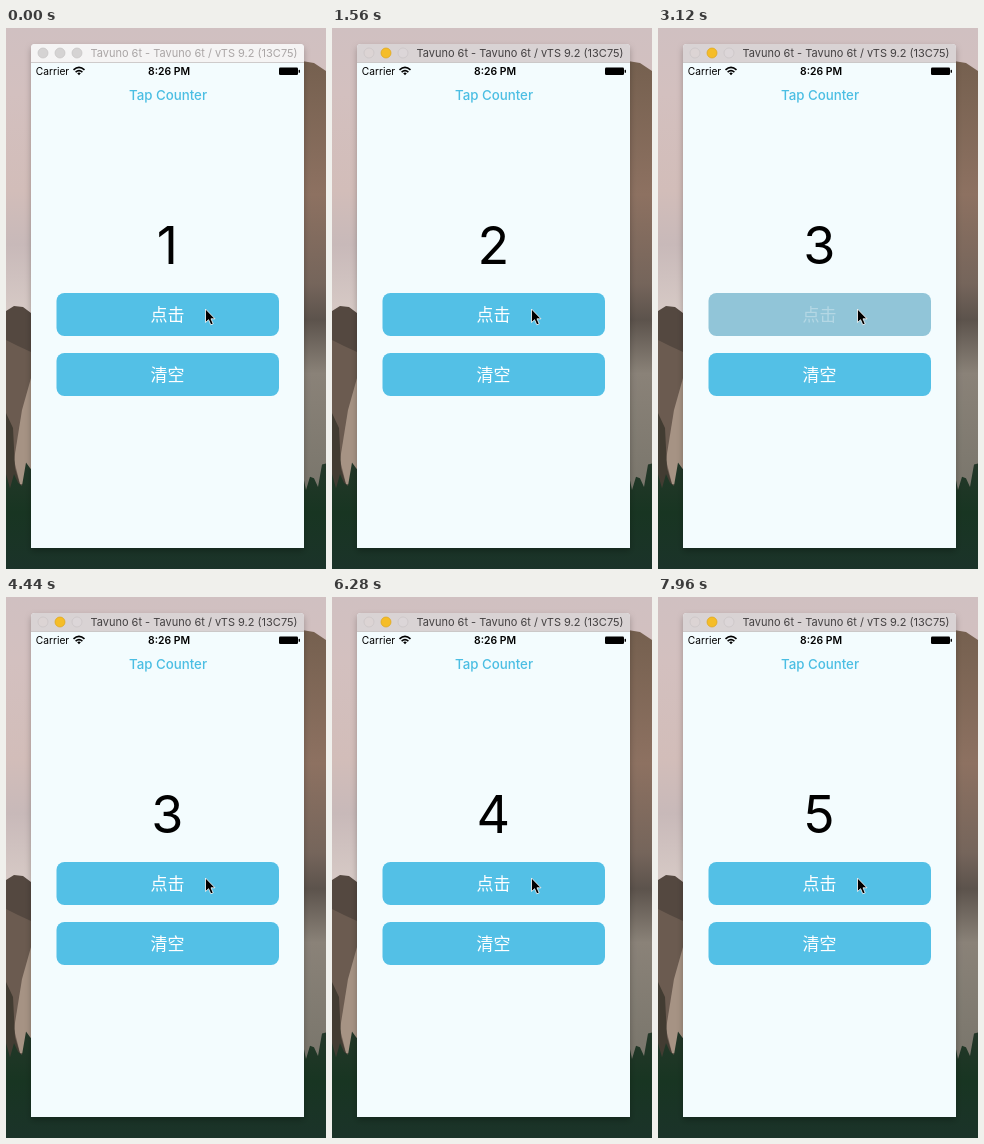
Animation of 320 by 541 pixels, one loop 8 s. Source, as an HTML page:

```html
<!DOCTYPE html>
<html lang="zh">
<head>
<meta charset="utf-8">
<title>Tap Counter</title>
<style>
  html, body { margin: 0; height: 100%; overflow: hidden; }
  svg { display: block; width: 100vw; height: 100vh; }
  text { font-family: Inter, Roboto, sans-serif; text-anchor: middle; }
  .label { font: 17px "Noto Sans CJK SC", "Noto Sans CJK", sans-serif; fill: #fff; }
</style>
</head>
<body>
<svg viewBox="0 0 320 541">
  <defs>
    <linearGradient id="sky" x2="0" y2="1">
      <stop offset="0" stop-color="#d0c0c1"/>
      <stop offset=".12" stop-color="#d3c0bf"/>
      <stop offset=".3" stop-color="#d2bdb9"/>
      <stop offset=".4" stop-color="#c8b9b9"/>
      <stop offset=".52" stop-color="#d6c9c5"/>
    </linearGradient>
    <linearGradient id="cliff" x2="0" y2="1">
      <stop offset="0" stop-color="#75604f"/>
      <stop offset=".3" stop-color="#8d7161"/>
      <stop offset=".5" stop-color="#75655b"/>
      <stop offset=".58" stop-color="#5c534c"/>
      <stop offset=".7" stop-color="#8a8278"/>
      <stop offset="1" stop-color="#77746a"/>
    </linearGradient>
    <linearGradient id="forest" x2="0" y2="1">
      <stop offset="0" stop-color="#26382a"/>
      <stop offset=".5" stop-color="#183522"/>
      <stop offset="1" stop-color="#1b3329"/>
    </linearGradient>
    <filter id="shadow" x="-20%" y="-10%" width="140%" height="120%">
      <feDropShadow dx="0" dy="3" stdDeviation="3" flood-opacity=".25"/>
    </filter>
  </defs>

  <!-- mountain wallpaper -->
  <rect width="320" height="541" fill="url(#sky)"/>
  <path d="M0 283L8 278L17 279L25 285L40 290V480H0Z" fill="#544840"/>
  <path d="M0 312L12 318L25 324V480H0Z" fill="#6b5b50"/>
  <path d="M25 350L16 382L8 432L14 456H30V350Z" fill="#a69384"/>
  <path d="M0 385L7 400L9 440L18 470H0Z" fill="#423c32"/>
  <path d="M290 32L308 35L320 43V480H290Z" fill="url(#cliff)"/>
  <path id="trees" fill="url(#forest)"/>

  <!-- simulator window -->
  <path d="M25 520V20Q25 16 29 16H294Q298 16 298 20V520Z" fill="#f3fcfe" filter="url(#shadow)"/>
  <path id="bar" d="M25 34.5V20Q25 16 29 16H294Q298 16 298 20V34.5Z"/>
  <path d="M25 34.5H298" stroke="#c5c1c1" stroke-width=".8"/>
  <g id="lights" stroke-width=".7">
    <circle cx="37" cy="25" r="5"/>
    <circle cx="54" cy="25" r="5"/>
    <circle cx="71" cy="25" r="5"/>
  </g>
  <text id="caption" x="188" y="29" font-size="11">Tavuno 6t - Tavuno 6t / vTS 9.2 (13C75)</text>

  <!-- status bar -->
  <text x="46.5" y="47" font-size="10.2">Carrier</text>
  <path d="M67.5 41.8Q73 36.8 78.5 41.8M69.6 44.1Q73 41.2 76.4 44.1" fill="none" stroke="#000" stroke-width="1.6"/>
  <path d="M71.2 45.2Q73 43.8 74.8 45.2L73 47.3Z"/>
  <text x="163" y="47" font-size="10.4" font-weight="600">8:26 PM</text>
  <rect x="273" y="39.5" width="19" height="7.5" rx="1.3"/>
  <rect x="292.6" y="41.8" width="1.4" height="3" rx=".6"/>

  <!-- app -->
  <text x="162" y="72" font-size="13.3" font-weight="500" fill="#4bbee3">Tap Counter</text>
  <text id="count" x="161.3" y="236" font-size="52"></text>
  <rect id="tap" x="50.5" y="265" width="222.5" height="43" rx="8"/>
  <text id="tapLabel" class="label" x="161.5" y="293">点击</text>
  <rect x="50.5" y="325" width="222.5" height="43" rx="8" fill="#53c0e6"/>
  <text class="label" x="161.5" y="353">清空</text>

  <path d="M199.5 281V294.5L202.6 291.7L204.8 296.8L207.2 295.8L205 290.8H209Z"
        stroke="#fff" stroke-width=".8" stroke-linejoin="round"/>
</svg>
<script>
const LOOP = 8000, HOLD = 100, FADE = 220;
const TAPS = [1300, 3100, 4700, 7000];
const ACTIVATE = TAPS[0] - HOLD;
const el = id => document.getElementById(id);
const mix = (a, b, k) => `rgb(${a.map((v, i) => Math.round(v + (b[i] - v) * k))})`;

let ridge = 'M0 541V440';
for (let x = 0; x <= 320; x += 4) {
  ridge += `L${x} ${446 + 10 * Math.sin(x * 2.1) + 9 * Math.sin(x * .17)}`;
}
el('trees').setAttribute('d', ridge + 'V541Z');

// Highlight is full while held, then fades after release.
function highlight(t) {
  return Math.max(0, ...TAPS.map(up => {
    const age = t - up;
    return age < -HOLD || age > FADE ? 0 : age < 0 ? 1 : 1 - age / FADE;
  }));
}

function setWindow(active) {
  const colors = active ? ['#dcd4d4', '#f5bd28', '#dcd6d8'] : Array(3).fill('#d5d3d3');
  el('bar').setAttribute('fill', active ? '#d9d3d4' : '#f5f4f4');
  el('caption').setAttribute('fill', active ? '#444142' : '#aaa6a6');
  [...el('lights').children].forEach((light, i) => {
    light.setAttribute('fill', colors[i]);
    light.setAttribute('stroke', active ? (i === 1 ? '#dda51c' : '#c9c3c5') : '#c6c3c3');
  });
}

function draw() {
  const t = performance.now() % LOOP;
  const press = highlight(t);
  setWindow(t >= ACTIVATE);
  el('count').textContent = 1 + TAPS.filter(up => t >= up).length;
  el('tap').setAttribute('fill', mix([83, 192, 230], [152, 197, 214], press));
  el('tapLabel').setAttribute('opacity', 1 - .75 * press);
  requestAnimationFrame(draw);
}
draw();
</script>
</body>
</html>
```
